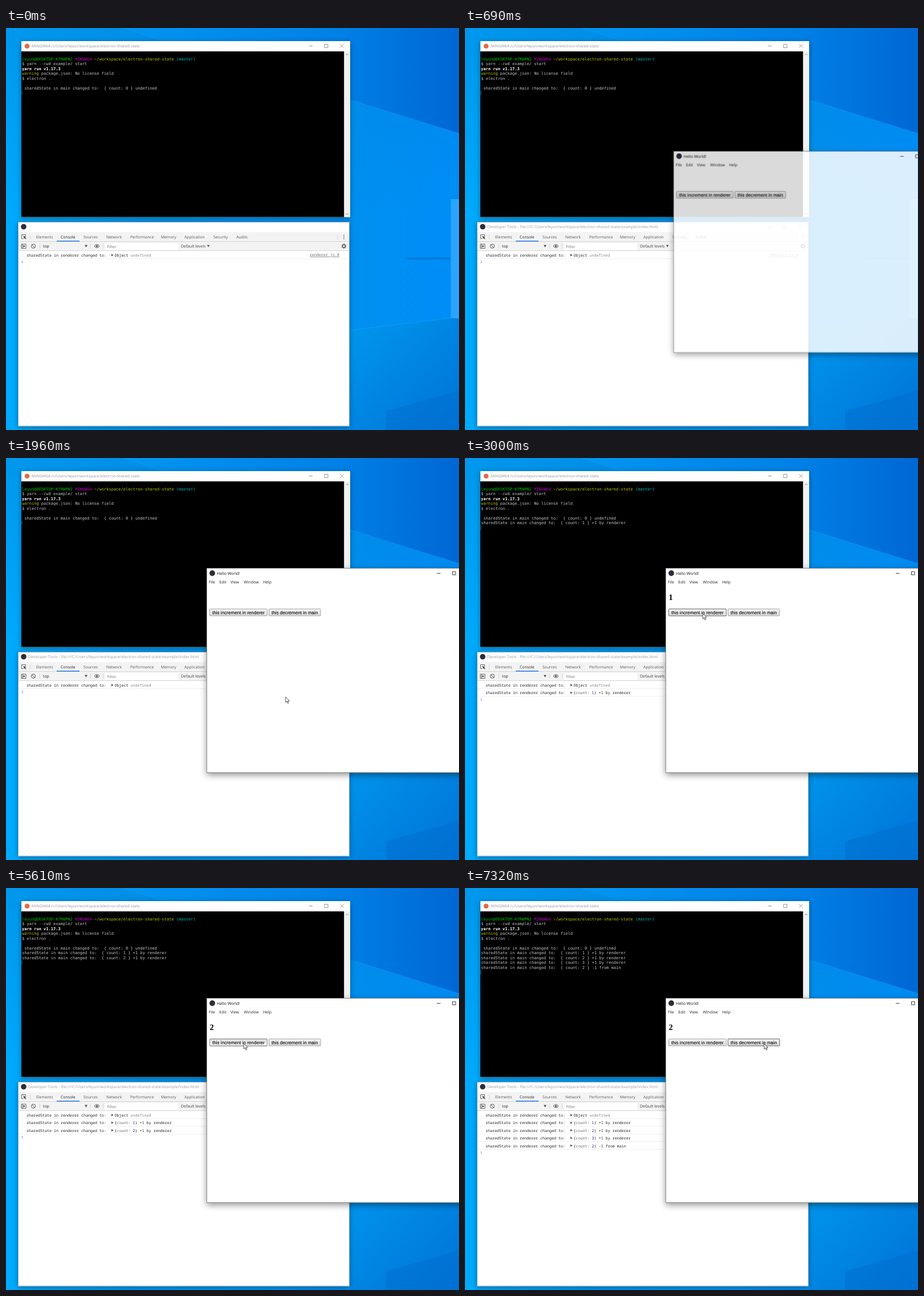
Recreate the animation shown at these times as an HTML page. Size 795 by 705 pixels, loop 8 s.

```html
<!DOCTYPE html>
<html lang="en">
<head>
<meta charset="utf-8">
<title>Shared state demo</title>
<style>
html, body { margin: 0; width: 100%; height: 100%; overflow: hidden; background: #0090f0; }
svg { display: block; }
text { white-space: pre; text-rendering: geometricPrecision; font: 6.93px "Open Sans", "Noto Sans", sans-serif; fill: #222; }
.term text { font: 7.04px "DejaVu Sans Mono", monospace; fill: #c4c4c4; }
.term .b { font-weight: bold; fill: #fff; }
.log text { font: 6.68px "Noto Sans Mono", "DejaVu Sans Mono", monospace; }
.tabs text { font-size: 6.85px; fill: #5a5a5a; }
.count { font: bold 14.5px "Liberation Serif", serif; fill: #000; }
.btn text { font: 8.11px "Liberation Sans", sans-serif; fill: #111; stroke: #111; stroke-width: .14; }
.ln { fill: none; stroke: #555; }
</style>
</head>
<body>
<svg id="stage" width="795" height="705" viewBox="0 0 795 705">
  <defs>
    <linearGradient id="sky">
      <stop offset="0" stop-color="#00aafc"/><stop offset=".3" stop-color="#0099f2"/>
      <stop offset=".77" stop-color="#0090f0"/><stop offset="1" stop-color="#008df8"/>
    </linearGradient>
    <linearGradient id="top" x1="200" x2="795" gradientUnits="userSpaceOnUse">
      <stop offset="0" stop-color="#0096f0"/><stop offset=".65" stop-color="#0080e6"/><stop offset="1" stop-color="#0067d4"/>
    </linearGradient>
    <linearGradient id="low" x2="1" y2="1">
      <stop offset="0" stop-color="#0098ee"/><stop offset="1" stop-color="#0072d6"/>
    </linearGradient>
    <linearGradient id="shade" x2="0" y2="1">
      <stop offset="0" stop-color="#0080d8" stop-opacity=".45"/><stop offset=".45" stop-color="#0080d8" stop-opacity="0"/>
    </linearGradient>
    <linearGradient id="up" x2="0" y2="1">
      <stop offset="0" stop-color="#f6f6f6"/><stop offset="1" stop-color="#dcdcdc"/>
    </linearGradient>
    <linearGradient id="down" x2="0" y2="1">
      <stop offset="0" stop-color="#dfdfdf"/><stop offset="1" stop-color="#f4f4f4"/>
    </linearGradient>
  </defs>

  <g id="wall">
    <path fill="url(#sky)" d="M0 0H795V705H0Z"/>
    <path fill="url(#shade)" d="M0 0H795V705H0Z"/>
    <path fill="url(#top)" d="M205 0H795V185L604 126Z"/>
    <path d="M205 0L604 126 795 185" fill="none" stroke="#1a9cff" stroke-opacity=".5"/>
    <path fill="url(#low)" d="M604 530L795 507V705H604Z"/>
    <path d="M604 530L795 507" fill="none" stroke="#18a4fb" stroke-opacity=".6"/>
    <path fill="#0070d2" fill-opacity=".55" d="M667 672L795 636V705H667Z"/>
    <path fill="#0076cc" d="M697 402.5L780 402V406L705 406Z" opacity=".7"/>
    <path fill="#2aa4ff" d="M780.5 300H990V509H780.5Z"/>
  </g>
  <g id="term" class="term"></g>
  <g id="tools"></g>
  <g transform="translate(352 193)"><g id="app"></g></g>
  <path id="mouse" d="M0 0V9.7L2.2 7.7 3.8 11.4 5.3 10.7 3.8 7.2H6.8Z" fill="#fff" stroke="#222" stroke-width=".8"/>
</svg>
<script>
const LOOP = 8000;
const ROW = 13.4, LINE = 8.53;

// press: button goes down, main: terminal log, ui: counter and console
const clicks = [
  { press: 2780, main: 2930, ui: 3000, n: 1, note: '+1 by renderer', btn: 0 },
  { press: 4240, main: 4500, ui: 4500, n: 2, note: '+1 by renderer', btn: 0 },
  { press: 5610, main: 5800, ui: 5850, n: 3, note: '+1 by renderer', btn: 0 },
  { press: 7130, main: 7250, ui: 7320, n: 2, note: '-1 from main', btn: 1 },
];

const $ = id => document.getElementById(id);
const txt = (x, y, s, attr = '') => `<text x="${x}" y="${y}" ${attr}>${s}</text>`;
const rect = (x, y, w, h, fill, attr = '') =>
  `<rect x="${x}" y="${y}" width="${w}" height="${h}" fill="${fill}" ${attr}/>`;
const line = (d, color = '#555', w = 1, attr = '') =>
  `<path d="${d}" fill="none" stroke="${color}" stroke-width="${w}" ${attr}/>`;
const span = (s, color) => `<tspan fill="${color}">${s}</tspan>`;
const dot = (x, y, r, fill) => `<circle cx="${x}" cy="${y}" r="${r}" fill="${fill}"/>`;
const shadow = (y, blur, a) => `style="filter:drop-shadow(0 ${y}px ${blur}px rgba(0,0,0,${a}))"`;
const controls = (x, y, color) =>
  line(`M${x} ${y}h6.5M${x + 27.5} ${y - 3}h6v6h-6ZM${x + 55} ${y - 3}l6 6m0-6l-6 6`, color, .9);

// Terminal
const termLine = (i, s, attr) => txt(28, 56.6 + i * LINE, s, attr);
const mainLog = (n, note) => `sharedState in main changed to:  { count: ${n} } ${note}`;
$('term').innerHTML =
  rect(27, 23, 577, 308.5, '#fff', shadow(2, 4, .38)) +
  rect(27, 41, 566.5, 290.5, '#000') +
  rect(593.5, 41, 10.5, 290.5, '#f1f1f1') +
  line('M596.5 47.5l2.2-2.2 2.2 2.2M596.5 325l2.2 2.2 2.2-2.2', '#777', .9) +
  dot(37, 31.7, 4.3, '#e2694a') +
  txt(45, 34.3, 'MINGW64:/c/Users/leyun/workspace/electron-shared-state',
    'style="font:6.93px \'Open Sans\',sans-serif;fill:#999"') +
  controls(531.5, 31.5, '#8a8a8a') +
  termLine(0, span('leyun@DESKTOP-K7RWPN2', '#00c000') + ' ' + span('MINGW64', '#c000c0') + ' ' +
    span('~/workspace/electron-shared-state', '#c2c200') + ' ' + span('(master)', '#00bcbc')) +
  termLine(1, '$ yarn --cwd example/ start') +
  termLine(2, 'yarn run v1.17.3', 'class="b"') +
  termLine(3, span('warning', '#c2c200') + ' package.json: No license field') +
  termLine(4, '$ electron .') +
  termLine(6, ' ' + mainLog(0, 'undefined')) +
  clicks.map((c, i) => termLine(7 + i, mainLog(c.n, c.note), `id="m${i}"`)).join('') +
  line('M28.2 110V117.5', '#777', .7, 'id="tcur"');

// Developer tools
const rowY = i => 401 + i * ROW;
const logRow = (i, body) => `<g id="r${i}">` +
  txt(36, rowY(i), 'sharedState in renderer changed to:') +
  `<path d="M185 ${rowY(i) - 5}l3.6 2.2-3.6 2.2Z" fill="#555"/>` + body +
  txt(533, rowY(i) - .8, 'renderer.js:8', 'style="fill:#666;text-decoration:underline"') +
  line(`M22 ${rowY(i) + 3.6}H602`, '#f0f0f0') + '</g>';
const tabs = [['Elements', 53], ['Console', 96], ['Sources', 136], ['Network', 176], ['Performance', 218],
  ['Memory', 272], ['Application', 313], ['Security', 364], ['Audits', 404]];
const title = (color, id) => `<g id="${id}">` +
  txt(39, 351.3, 'Developer Tools - file:///C:/Users/leyun/workspace/electron-shared-state/example/index.html',
    `style="fill:${color}"`) + controls(530, 348.5, color) + '</g>';

$('tools').innerHTML =
  rect(21, 340, 582, 358.5, '#fff', shadow(2, 4, .38)) +
  rect(21, 340, 582, 358.5, '#fff', 'id="glow" ' + shadow(2, 5, .45)) +
  line('M21.5 340.5H602.5V698H21.5Z', '#4a7fa5', .6) +
  dot(31, 348.5, 4.8, '#2b2e3a') + title('#111', 'lit') + title('#9c9c9c', 'dim') +
  rect(22, 358, 580, 32.5, '#f3f3f3') +
  line('M22 374.5H602M22 390.5H602', '#cfcfcf', .8) +
  line('M42.5 362v9M582 362v9M59.5 378v9M148 378v9M170.5 378v9', '#ccc', .8) +
  '<g class="tabs">' + tabs.map(([s, x]) =>
    txt(x, 368.8, s, s === 'Console' ? 'style="fill:#222"' : '')).join('') + '</g>' +
  rect(89, 373, 40, 1.4, '#1a73e8') +
  line('M34.5 365V362.5H27.5V369.5H30', '#555', .9) +
  '<path d="M30.5 364.5l5 2-2 .9 2.2 2.2-.9.9-2.2-2.2-.8 1.9Z" fill="#444"/>' +
  [363, 366.2, 369.4].map(y => dot(593, y, .85, '#555')).join('') +
  line('M27 379h8v7.5h-8ZM29 379v7.5', '#555', .9) +
  '<path d="M30.5 380.8l3.4 2-3.4 2Z" fill="#444"/>' +
  '<circle class="ln" cx="48" cy="382.6" r="3.6"/>' + line('M45.5 380.1l5 5', '#555') +
  txt(65, 385, 'top') + '<path d="M138 380.5h5l-2.5 4.2ZM352.8 380.5h4.6l-2.3 4Z" fill="#555"/>' +
  line('M155 382.5q4.5-5.6 9 0q-4.5 5.6-9 0Z', '#444', 1) + dot(159.5, 382.5, 1.6, '#444') +
  rect(174, 377, 128, 12, '#fff') +
  txt(177.5, 385.6, 'Filter', 'style="fill:#777"') +
  txt(307, 385.2, 'Default levels', 'style="fill:#444"') +
  '<circle class="ln" cx="593" cy="382.5" r="2.6" stroke-width="1.5"/>' +
  '<circle class="ln" cx="593" cy="382.5" r="3.9" stroke-dasharray="1.5 1.56"/>' +
  '<g class="log">' +
  logRow(0, txt(190.5, rowY(0), 'Object') + txt(218.5, rowY(0), 'undefined', 'style="fill:#888"')) +
  clicks.map((c, i) => logRow(i + 1,
    txt(190.5, rowY(i + 1), `{${span('count', '#666')}: ${span(c.n, '#1a1aa6')}}`, 'font-style="italic"') +
    txt(234.8, rowY(i + 1), c.note))).join('') + '</g>' +
  line('M27.5 408.2l2.1 2-2.1 2', '#3b82f0', 1, 'id="prompt"') +
  line('M36.3 406V414', '#222', .9, 'id="caret"');

// App window, drawn from its own corner
const buttons = [[5, 102, 'this increment in renderer'], [109, 91.5, 'this decrement in main']];
const frame = (x, w, fill, color, id) =>
  rect(x + .5, 71.8, w - 1, 12, fill, `stroke="${color}" stroke-width=".9" rx=".6" id="${id}"`);
$('app').innerHTML =
  rect(0, 0, 485, 359, '#fff', shadow(4, 6, .42)) +
  line('M.4.4H485V358.7H.4Z', '#666', .8) +
  dot(10, 9, 4.9, '#2b2e3a') + txt(18, 12, 'Hello World!', 'style="font-size:7.02px;fill:#111"') +
  line('M404 9.3h6.5M431.5 6.3h5.6v5.6h-5.6Z', '#222', .9) +
  [['File', 4], ['Edit', 22.3], ['View', 42], ['Window', 65.5], ['Help', 99]].map(([s, x]) => txt(x, 27.3, s)).join('') +
  [0, ...clicks.map(c => c.n)].map((n, i) => txt(5.5, 56, n, `class="count" id="c${i}"`)).join('') +
  '<g class="btn">' + buttons.map(([x, w, s], i) =>
    frame(x, w, 'url(#up)', '#999', 'b' + i) + frame(x, w, 'url(#up)', '#666', 'h' + i) +
    `<g id="p${i}">` + frame(x, w, 'url(#down)', '#888', 'd' + i) + '</g>' +
    txt(x + 5, 80.8, s)).join('') + '</g>';

// Motion: frames are [time, value, easing]
const play = (id, prop, frames, easing = 'step-end') => $(id).animate(
  [...frames, [LOOP, frames.at(-1)[1]]].map(([t, v, e = easing]) => ({ offset: t / LOOP, [prop]: v, easing: e })),
  { duration: LOOP, iterations: Infinity });
const show = (id, ...spans) => play(id, 'opacity',
  [[0, 0], ...spans.flatMap(([a, b]) => b ? [[a, 1], [b, 0]] : [[a, 1]])]);
const move = (x, y) => `translate(${x}px, ${y}px)`;

show('caret', [0, 60]);
show('lit', [0, 470]);
show('glow', [0, 470]);
show('dim', [470]);

clicks.forEach((c, i) => {
  show('m' + i, [c.main]);
  show('r' + (i + 1), [c.ui]);
});
[0, ...clicks.map(c => c.ui)].forEach((t, i) => show('c' + i, [t, clicks[i]?.ui]));
play('tcur', 'transform', [[0, move(0, 0)], ...clicks.map((c, i) => [c.main, move(0, (i + 1) * LINE)])]);
play('prompt', 'transform', [[0, move(0, 0)], ...clicks.map((c, i) => [c.ui, move(0, (i + 1) * ROW)])]);
show('h0', [2700, 6220]);
show('h1', [6320]);
[0, 1].forEach(b => show('p' + b, ...clicks.filter(c => c.btn === b).map(c => [c.press, c.main])));

// The window springs up from the lower right while fading in
const times = Array.from({ length: 24 }, (_, i) => 550 + i * 20);
const pose = t => {
  const k = t > 1000 ? 0 : Math.exp((590 - t) / 60.5);
  return `${move(73 * k, 121 * k)} scale(${1 - .081 * k})`;
};
play('app', 'transform', [0, ...times].map(t => [t, pose(Math.max(t, 550))]), 'linear');
play('app', 'opacity', [[0, 0], [559, 0], [713, 1]], 'linear');

show('mouse', [1340]);
play('mouse', 'transform', [
  [0, move(482.4, 432.4)],
  [1660, move(484.6, 434)],
  [1800, move(484.6, 434), 'ease-in'],
  [1960, move(490.6, 418.8)],
  [2100, move(490.6, 418.8), 'ease-in-out'],
  [2760, move(417.3, 272.5)],
  [6000, move(417.3, 272.5), 'ease-in'],
  [6280, move(474, 278.5), 'ease-out'],
  [6570, move(525, 272.8)],
]);
</script>
</body>
</html>
```
